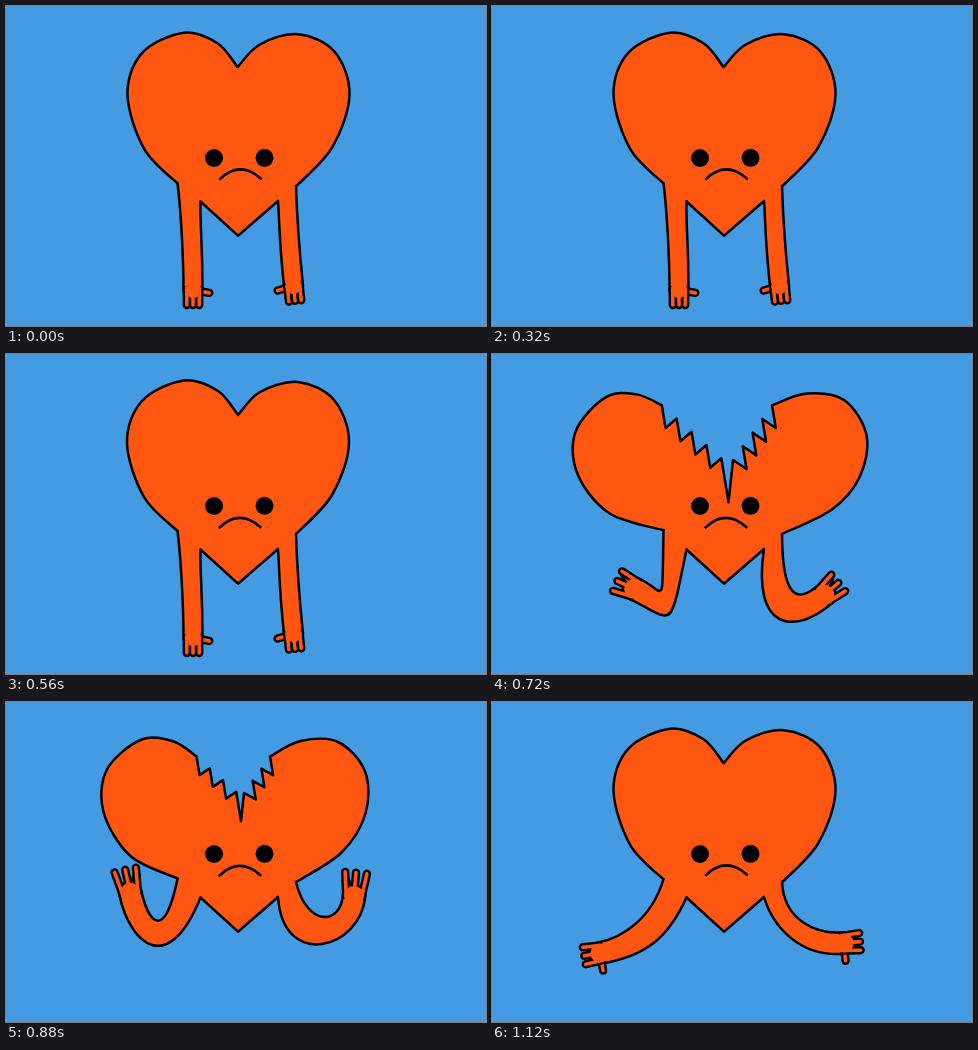
Recreate the animation shown at these times as an HTML page. Size 480 px wide and 320 px high, loop 1200 ms.

```html
<!DOCTYPE html>
<html lang="en">
<head>
<meta charset="utf-8">
<title>Broken heart</title>
<style>
  html, body { margin: 0; width: 100%; height: 100%; overflow: hidden; background: #459be2; }
  svg { display: block; width: 100%; height: 100%; }
  path, line, circle { stroke-linecap: round; stroke-linejoin: round; }
  .skin { fill: #ff5711; }
  .ink { stroke: #000; stroke-width: 2.5; }
  .line { fill: none; }
  .finger { stroke: #000; stroke-width: 8.4; }
  .finger + .finger { stroke: #ff5711; stroke-width: 3.6; }
</style>
</head>
<body>
<svg viewBox="0 0 480 320">
  <path id="lobes" class="skin ink"/>
  <path class="skin" d="M171 177L232 168L290 180L282.5 189L272 195L232 229L194 195L181 188Z"/>
  <path class="ink line" d="M194.5 195.5L232 229.7L272 195"/>
  <g id="leftArm"></g>
  <g id="rightArm"></g>
  <circle cx="208" cy="152" r="9"/>
  <circle cx="258.5" cy="151.8" r="9"/>
  <path id="mouth" class="ink line" d="M214 173Q234 154 255 172.7"/>
</svg>
<script>
const LOOP = 1200, STEP = 80, REST_STEPS = 8;
const $ = id => document.getElementById(id);

// Blends numbers, arrays and objects of the same structure.
function mix(a, b, t) {
  if (typeof a === 'number') return a + (b - a) * t;
  if (Array.isArray(a)) return a.map((v, i) => mix(v, b[i], t));
  return Object.fromEntries(Object.keys(a).map(k => [k, mix(a[k], b[k], t)]));
}
const add = (p, q, k = 1) => [p[0] + q[0] * k, p[1] + q[1] * k];

// Smooth curve through the points, without the opening move.
function smooth(p) {
  let d = '';
  for (let i = 0; i < p.length - 1; i++) {
    const a = p[i], b = p[i + 1], before = p[i - 1] || a, after = p[i + 2] || b;
    const c1 = a.map((v, k) => v + (b[k] - before[k]) / 6);
    const c2 = b.map((v, k) => v - (after[k] - a[k]) / 6);
    d += `C${c1} ${c2} ${b}`;
  }
  return d;
}

// Each lobe runs from its shoulder to the cleft.
const whole = {
  left: [[171.5, 177], [138, 143], [121, 89], [136, 47], [178, 26.5], [212, 37], [232, 61]],
  right: [[290, 180], [326, 141], [343, 89], [328, 46], [292, 28], [254, 38], [232, 61]]
};
const torn = {
  left: [[172, 176], [111, 165], [74, 131], [66, 88], [92, 49], [122, 41.5], [149, 48]],
  right: [[290, 180], [345, 160], [376, 134], [390, 93], [372, 52], [335, 40], [296, 48]]
};

// Teeth step down from the cleft towards the tip of the crack.
function teeth(top, end, depth) {
  const count = Math.ceil(4 * depth), points = [];
  for (let i = 0; i < count; i++) {
    points.push(add(mix(top, end, i / count), [4, 24], Math.sqrt(depth)));
    points.push(mix(top, end, (i + 1) / count));
  }
  return points;
}

function lobes(open, boil) {
  const wobble = (p, i) => add(p, [Math.sin(i * 7), Math.cos(i * 5)], boil);
  const { left, right } = mix(whole, torn, open);
  const a = left.map(wobble), b = right.map(wobble).reverse();
  const depth = Math.min(1, 1.2 * open);
  const tip = mix([232, 61], [237, 158], depth);
  const crack = [
    ...teeth(a[a.length - 1], add(tip, [-8, -49], depth), depth), tip,
    ...teeth(b[0], add(tip, [5, -47], depth), depth).reverse(), b[0]
  ];
  return `M${a[0]}${smooth(a)}L${crack.join('L')}${smooth(b)}`;
}

const hands = [
  { half: 9.5, pull: 30, reach: 19, spread: 0, thumb: -80 },
  { half: 12, pull: 30, reach: 24, spread: 11, thumb: 67 },
  { half: 10.3, pull: 33, reach: 31, spread: 4, thumb: 0 },
  { half: 10.8, pull: 25, reach: 20, spread: 4, thumb: -90 }
];
// Hanging, raised, pressing the halves together, spread out.
// Bends steer the edge from the shoulder and the edge from the armpit.
const leftArm = {
  side: 1, shoulder: [171.5, 177], armpit: [194.5, 195.5],
  poses: [
    { wrist: [187, 284], angle: 90, bend: [175, 205], underBend: [194, 225] },
    { wrist: [127.5, 218.5], angle: 243, bend: [168, 277], underBend: [171, 300] },
    { wrist: [121, 163], angle: 272, bend: [148, 207], underBend: [154, 250] },
    { wrist: [108, 251], angle: 170, bend: [160, 216], underBend: [176, 236] }
  ]
};
const rightArm = {
  side: -1, shoulder: [290, 180], armpit: [272, 195],
  poses: [
    { wrist: [287.5, 280], angle: 84, bend: [291, 212], underBend: [274, 225] },
    { wrist: [347, 228], angle: -82, bend: [290, 246], underBend: [255, 292] },
    { wrist: [349, 160], angle: -88, bend: [311, 202], underBend: [299, 246] },
    { wrist: [352, 241], angle: -5, bend: [292, 220], underBend: [281, 225] }
  ]
};

function poseAt(poses, t) {
  const i = Math.min(Math.floor(t), poses.length - 2);
  return mix(poses[i], poses[i + 1], t - i);
}

function finger(from, to) {
  const ends = `x1="${from[0]}" y1="${from[1]}" x2="${to[0]}" y2="${to[1]}"`;
  return `<g><line class="finger" ${ends}/><line class="finger" ${ends}/></g>`;
}

function arm({ side, shoulder, armpit, poses }, t) {
  const { wrist, angle, bend, underBend } = poseAt(poses, t);
  const { half, pull, reach, spread, thumb } = poseAt(hands, t);
  const rad = Math.PI / 180;
  const toward = turn => {
    const a = (angle + side * turn) * rad;
    return [Math.cos(a), Math.sin(a)];
  };
  const along = toward(0), across = toward(90);
  const over = add(wrist, across, half), under = add(wrist, across, -half);
  const overCurve = `C${bend} ${add(over, along, -pull)} ${over}`;
  const underPull = add(under, along, -pull - 20);

  let digits = finger(wrist, add(wrist, toward(thumb), half + 7));
  for (const i of [-1, 0, 1]) {
    const base = add(wrist, across, i * (half - 3.3));
    digits += finger(base, add(base, toward(i * spread), reach - 4));
  }
  const palm = (r, look) => `<circle class="${look}" cx="${wrist[0]}" cy="${wrist[1]}" r="${r}"/>`;
  return palm(half, 'skin ink') +
    `<path class="skin" d="M${shoulder}${overCurve}L${under}C${underPull} ${underBend} ${armpit}Z"/>` +
    `<path class="ink line" d="M${shoulder}${overCurve}M${armpit}C${underBend} ${underPull} ${under}"/>` +
    digits + palm(half - 1.2, 'skin');
}

// The heart tears, then the arms push it shut and let go.
const action = [
  { open: 0.3, arms: 0.35 },
  { open: 0.75, arms: 0.75 },
  { open: 1, arms: 1 },
  { open: 0.5, arms: 1.5 },
  { open: 0.12, arms: 2 },
  { open: 0, arms: 2.5 },
  { open: 0, arms: 3 }
];

function render(ms) {
  const step = Math.floor(ms % LOOP / STEP);
  const { open, arms } = step < REST_STEPS ? { open: 0, arms: 0 } : action[step - REST_STEPS];
  const boil = step % 2 ? 0 : 0.5;
  $('lobes').setAttribute('d', lobes(open, boil));
  $('mouth').setAttribute('transform', `translate(${boil - 0.5} ${0.5 - boil})`);
  $('leftArm').innerHTML = arm(leftArm, arms);
  $('rightArm').innerHTML = arm(rightArm, arms);
}

const start = performance.now();
function tick() {
  render(performance.now() - start);
  requestAnimationFrame(tick);
}
tick();
</script>
</body>
</html>
```
